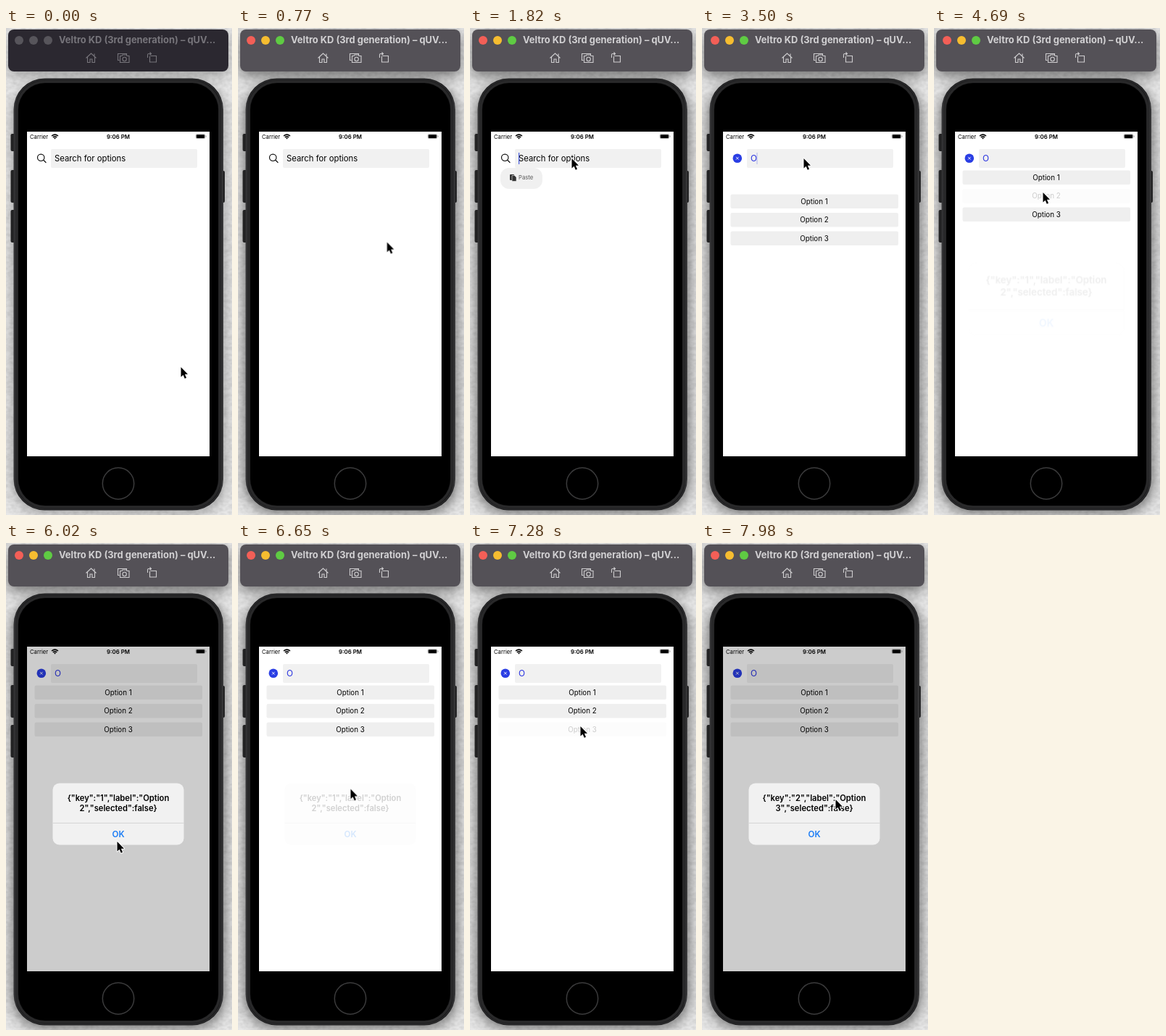
These frames come from a looping animation (312x672 px, 8 s). An HTML page:

```html
<!DOCTYPE html>
<html lang="en">
<head>
<meta charset="utf-8">
<title>Search options demo</title>
<style>
html, body { margin: 0; width: 100%; height: 100%; overflow: hidden; background: #e2e2e2; }
svg { display: block; width: 100vw; height: 100vh; font-family: Inter, "Liberation Sans", sans-serif; }
.mid { text-anchor: middle; }

[class*="a-"] { animation: 8s linear infinite; }
.a-wake { animation-name: wake; fill: currentColor; }
.a-line { animation-name: wake; fill: none; stroke: currentColor; stroke-width: 1.1; }
.a-shade { animation-name: shade; }
.a-cursor { animation-name: cursor; }
.a-empty { animation-name: empty; }
.a-typed { animation-name: typed; }
.a-caret1 { animation-name: caret1; }
.a-caret2 { animation-name: caret2; }
.a-paste { animation-name: paste; }
.a-list { animation-name: slide; }
.a-press2 { animation-name: press2; }
.a-press3 { animation-name: press3; }
.a-dim { animation-name: dim; animation-timing-function: ease-in-out; }
.a-alert { animation-name: show, pop; animation-timing-function: ease-in-out; transform-origin: 155px 373.5px; }
.a-first { animation-name: first; }
.a-second { animation-name: second; }

@keyframes wake { 0%, 1.74% { color: var(--off); } 1.75%, 100% { color: var(--on); } }
@keyframes shade { 0%, 1.74% { opacity: .3; } 1.75%, 100% { opacity: .5; } }
@keyframes cursor {
  0%, .9% { transform: translate(241px, 467px); animation-timing-function: ease-in; }
  5.25% { transform: translate(232px, 410px); }
  10.5% { transform: translate(200px, 272px); animation-timing-function: ease-out; }
  19.25%, 45.5% { transform: translate(140px, 179px); animation-timing-function: ease-in-out; }
  52.5%, 65.6% { transform: translate(150px, 226px); animation-timing-function: ease-in; }
  70% { transform: translate(152px, 370px); animation-timing-function: ease-out; }
  72.6% { transform: translate(154px, 432px); animation-timing-function: ease-in-out; }
  75.25% { transform: translate(153px, 411px); }
  78.75%, 80.5% { transform: translate(153px, 403px); animation-timing-function: ease-in; }
  83.12% { transform: translate(155px, 339px); animation-timing-function: ease-out; }
  88.4%, 92.5% { transform: translate(152px, 252px); animation-timing-function: ease-in-out; }
  99.7%, 100% { transform: translate(184px, 353px); }
}
@keyframes empty { 0%, 34.6% { opacity: 1; } 34.61%, 100% { opacity: 0; } }
@keyframes typed { 0%, 34.6% { opacity: 0; } 34.61%, 100% { opacity: 1; } }
@keyframes caret1 {
  0%, 20.9% { opacity: 0; } 21%, 29.5% { opacity: 1; }
  32%, 100% { opacity: 0; }
}
@keyframes caret2 {
  0%, 34.6% { opacity: 0; } 34.61%, 42.5% { opacity: 1; }
  45%, 48% { opacity: 0; } 50%, 55.9% { opacity: 1; }
  56%, 100% { opacity: 0; }
}
@keyframes paste {
  0%, 20.9% { opacity: 0; } 22.7%, 34.6% { opacity: 1; }
  37%, 100% { opacity: 0; }
}
@keyframes slide {
  0%, 34% { transform: translateY(300px); animation-timing-function: cubic-bezier(.42, 0, 1, 1); }
  40.12% { transform: translateY(150px); animation-timing-function: cubic-bezier(0, 0, .58, 1); }
  46.25%, 100% { transform: none; }
}
@keyframes press2 { 0%, 55.9% { opacity: 1; } 57%, 58.7% { opacity: .2; } 61.8%, 100% { opacity: 1; } }
@keyframes press3 { 0%, 89.9% { opacity: 1; } 91%, 92.6% { opacity: .2; } 95.8%, 100% { opacity: 1; } }
@keyframes dim {
  0%, 58.5% { opacity: 0; } 62.75%, 80.5% { opacity: 1; }
  83%, 92.5% { opacity: 0; } 96.75%, 100% { opacity: 1; }
}
@keyframes show {
  0%, 57.75% { opacity: 0; } 62.75%, 80.5% { opacity: 1; }
  84.25%, 91.75% { opacity: 0; } 96.75%, 100% { opacity: 1; }
}
@keyframes pop {
  0%, 57.75% { transform: scale(1.2); } 62.75%, 87.4% { transform: none; }
  87.5%, 91.75% { transform: scale(1.2); } 96.75%, 100% { transform: none; }
}
@keyframes first { 0%, 87.4% { opacity: 1; } 87.5%, 100% { opacity: 0; } }
@keyframes second { 0%, 87.4% { opacity: 0; } 87.5%, 100% { opacity: 1; } }
</style>
</head>
<body>
<svg viewBox="0 0 312 672" preserveAspectRatio="none">
  <defs>
    <filter id="blur" x="-20%" y="-20%" width="140%" height="140%"><feGaussianBlur stdDeviation="9"/></filter>
    <filter id="paper" x="0" y="0" width="100%" height="100%">
      <feTurbulence type="fractalNoise" baseFrequency=".14 .2" numOctaves="2" seed="4"/>
      <feColorMatrix values="0 0 0 0 0  0 0 0 0 0  0 0 0 0 0  .16 0 0 0 -.05"/>
    </filter>
    <clipPath id="screen"><rect x="29" y="143" width="252" height="448"/></clipPath>
    <linearGradient id="rim" x2="1" y2="0">
      <stop stop-color="#343435"/><stop offset=".02" stop-color="#1c1c1d"/>
      <stop offset=".98" stop-color="#1c1c1d"/><stop offset="1" stop-color="#343435"/>
    </linearGradient>
  </defs>

  <!-- desktop -->
  <rect width="312" height="672" fill="#e8e8e8"/>
  <rect width="312" height="672" filter="url(#paper)"/>
  <g class="a-shade" filter="url(#blur)">
    <rect x="3" y="8" width="304" height="58" rx="8"/>
    <rect x="8" y="76" width="295" height="594" rx="44"/>
  </g>

  <!-- window bar -->
  <rect class="a-wake" style="--off:#2b2830;--on:#545157" x="3" y="2" width="304" height="58" rx="8"/>
  <circle class="a-wake" style="--off:#57555b;--on:#f35f57" cx="18" cy="17" r="6"/>
  <circle class="a-wake" style="--off:#57555b;--on:#f6bd30" cx="38" cy="17" r="6"/>
  <circle class="a-wake" style="--off:#57555b;--on:#5fcb43" cx="58" cy="17" r="6"/>
  <text class="a-wake" style="--off:#77757b;--on:#d2d1d3" x="73" y="21.2" font-size="12.9" font-weight="700">Veltro KD (3rd generation) – qUV...</text>
  <g class="a-line" style="--off:#77757b;--on:#cfced0">
    <path d="M110.500 41.500 117.500 35 124.500 41.500M112.500 40V47.500H116V43H119V47.500H122.500V40M122 38.500V35.500"/>
    <path d="M156.500 44.500H154.500V35.500H166.500V37.500M157.500 38.500H160L161 37H166L167 38.500H170V47.500H157.500Z"/>
    <circle cx="163.600" cy="43" r="2.700"/>
    <path d="M199.500 38.500H207.500V47H198.500V39M195.500 41V37Q195.500 35.500 197 35.500H200M198.500 33.500 200.500 35.500 198.500 37.500"/>
  </g>

  <!-- device -->
  <g fill="#222223">
    <rect x="6.5" y="146" width="8" height="24" rx="2"/>
    <rect x="6.5" y="196" width="8" height="45" rx="2"/>
    <rect x="6.5" y="251" width="8" height="45" rx="2"/>
    <rect x="294" y="197" width="8" height="44" rx="2"/>
  </g>
  <rect x="10.5" y="69.5" width="289.5" height="596" rx="43" fill="url(#rim)"/>
  <rect x="12" y="71" width="286.5" height="593" rx="41.5" fill="none" stroke="#3c3c3e" stroke-width=".7"/>
  <rect x="15" y="74" width="280" height="587" rx="39" fill="none" stroke="#29292a" stroke-width="3"/>
  <rect x="17" y="76" width="276" height="583" rx="37"/>
  <circle cx="155" cy="628.5" r="21.7" fill="none" stroke="#3b3b3c" stroke-width="1.5"/>

  <!-- app -->
  <g clip-path="url(#screen)">
    <rect x="29" y="143" width="252" height="448" fill="#fff"/>
    <text x="33" y="152.8" font-size="7.7">Carrier</text>
    <path d="M63 149Q67.500 145.200 72 149M64.800 150.800Q67.500 148.600 70.200 150.800" fill="none" stroke="#000" stroke-width="1.5"/>
    <path d="M66 151.800Q67.500 150.600 69 151.800L67.500 153.400Z"/>
    <text class="mid" x="155" y="152.8" font-size="7.8" font-weight="600">9:06 PM</text>
    <rect x="262" y="146.500" width="13" height="6" rx="1.600" fill="none" stroke="#999" stroke-width=".6"/>
    <rect x="262.800" y="147.200" width="11.400" height="4.700" rx="1"/>
    <rect x="275.600" y="148.500" width=".9" height="2" fill="#999"/>

    <rect x="62" y="167" width="202" height="26" rx="2" fill="#f1f1f1"/>
    <g class="a-empty">
      <g fill="none" stroke="#111" stroke-width="1.2" stroke-linecap="round">
        <circle cx="48.2" cy="178.8" r="4.700"/><path d="M51.700 182.300 55 185.500"/>
      </g>
      <text x="67" y="184.2" font-size="11.3">Search for options</text>
    </g>
    <rect class="a-caret1" x="67" y="172" width="1.2" height="16" fill="#4b5fe0"/>
    <g class="a-typed">
      <circle cx="48.800" cy="179.700" r="6.300" fill="#2a3ee4"/>
      <path d="M47 177.900 50.600 181.500M50.600 177.900 47 181.500" stroke="#fff" stroke-width=".9"/>
      <text x="67" y="184.3" font-size="11.8" fill="#2630e0">O</text>
      <rect class="a-caret2" x="75.5" y="172" width="1" height="16" fill="#6d78e8"/>
    </g>

    <g class="a-paste">
      <rect x="42" y="193" width="58" height="29" rx="12" fill="#f0f0f0"/>
      <rect x="55" y="202" width="6" height="8" rx="1" fill="#333"/>
      <path d="M58 203.500H61.500L64 206V211.500H58Z" fill="#333" stroke="#f0f0f0" stroke-width=".6"/>
      <text x="67" y="209" font-size="7.7" fill="#555">Paste</text>
    </g>

    <g class="a-typed"><g class="a-list" font-size="9.8">
      <g>
        <rect x="39.5" y="196.5" width="231.5" height="19.5" rx="2" fill="#efefef"/>
        <text class="mid" x="155" y="209.600">Option 1</text>
      </g>
      <g class="a-press2">
        <rect x="39.5" y="222" width="231.5" height="19.5" rx="2" fill="#efefef"/>
        <text class="mid" x="155" y="235.100">Option 2</text>
      </g>
      <g class="a-press3">
        <rect x="39.5" y="247.5" width="231.5" height="19.5" rx="2" fill="#efefef"/>
        <text class="mid" x="155" y="260.600">Option 3</text>
      </g>
    </g></g>

    <rect class="a-dim" x="29" y="143" width="252" height="448" fill="rgba(0,0,0,.2)"/>
    <g class="a-alert">
      <rect x="64.5" y="331.5" width="181" height="85" rx="9" fill="#f1f1f1"/>
      <path d="M64.500 386.500H245.500" stroke="#cfcfcf" stroke-width=".8"/>
      <g class="mid" font-size="11.2" font-weight="600">
        <g class="a-first">
          <text x="155" y="355.5">{"key":"1","label":"Option</text>
          <text x="155" y="370.2">2","selected":false}</text>
        </g>
        <g class="a-second">
          <text x="155" y="355.5">{"key":"2","label":"Option</text>
          <text x="155" y="370.2">3","selected":false}</text>
        </g>
        <text x="155" y="405.6" font-size="11.6" fill="#1b7cf5">OK</text>
      </g>
    </g>
  </g>

  <g class="a-cursor">
    <path d="M.5 1V14.500L3.600 11.700 5.800 16.800 8 15.800 5.900 10.800H10Z" stroke="#fff" stroke-width="2" stroke-linejoin="round" paint-order="stroke"/>
  </g>
</svg>
</body>
</html>
```
